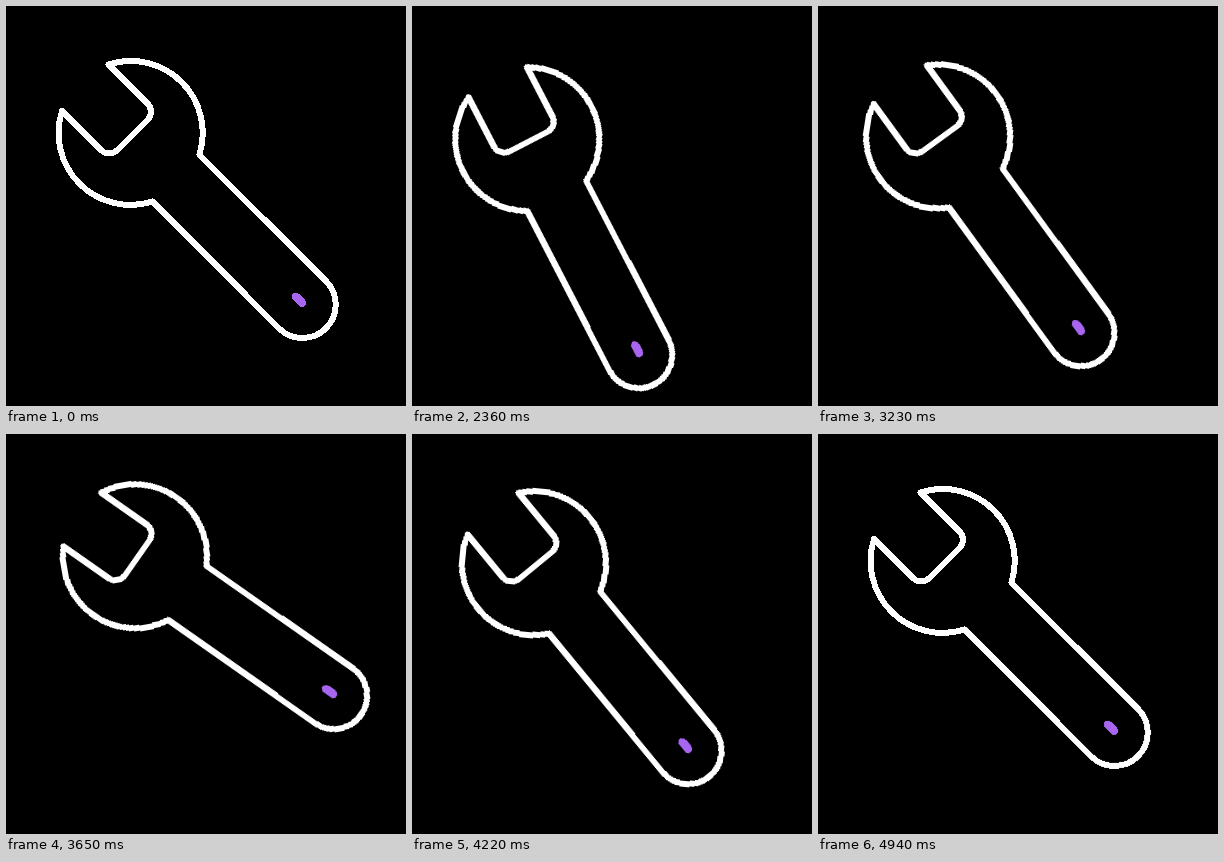
An HTML page that plays this animation: 400x400 px, repeating every 4970 ms.

```html
<!DOCTYPE html>
<html lang="en">
<head>
<meta charset="utf-8">
<title>Turning wrench</title>
<style>
  html, body { margin: 0; width: 100%; height: 100%; overflow: hidden; background: #000; }
  svg { display: block; width: 100vw; height: 100vh; }
  #wrench {
    fill: none; stroke-linecap: round; stroke-linejoin: round;
    shape-rendering: crispEdges; transform-origin: 100px 100px;
  }
</style>
</head>
<body>
<svg viewBox="0 0 400 400">
  <g id="wrench">
    <path stroke="#fff" stroke-width="6" d="M102.5 58.5 L141.6 97.6 A11.5 11.5 0 0 1 141.6 113.8 L111.3 144.1 A11.5 11.5 0 0 1 95.1 144.1
      L56 105 A72 72 0 0 0 146.5 195.5 L273.9 323.2 A33.3 33.3 0 0 0 321 276.2 L193.4 148.7 A72 72 0 0 0 102.5 58.5 Z"/>
    <path stroke="#a866f0" stroke-width="8.5" d="M289.9 290.8 L295.8 296.7"/>
  </g>
</svg>
<script>
  const LOOP = 4970, START = 2030, STEP = 30;
  const UP = -10, DOWN = 22;

  // [time in ms, angle in degrees]
  const poses = [
    [0, 0], [2000, 0],
    [2288, DOWN], [2738, UP],
    [3060, DOWN], [3682, UP],
    [4075, DOWN], [4530, UP],
    [LOOP, 0]
  ];

  const swing = document.getElementById('wrench').animate(
    poses.map(([time, angle]) => ({
      offset: time / LOOP,
      transform: `rotate(${angle}deg)`,
      easing: 'cubic-bezier(.3, 0, .2, 1)'
    })),
    { duration: LOOP, fill: 'both' }
  );
  swing.pause();

  const begin = performance.now();

  function draw() {
    const t = (performance.now() - begin) % LOOP;
    // The motion advances in fixed steps after the rest
    swing.currentTime = t < START ? 0 : START + Math.floor((t - START) / STEP) * STEP;
    requestAnimationFrame(draw);
  }
  draw();
</script>
</body>
</html>
```
